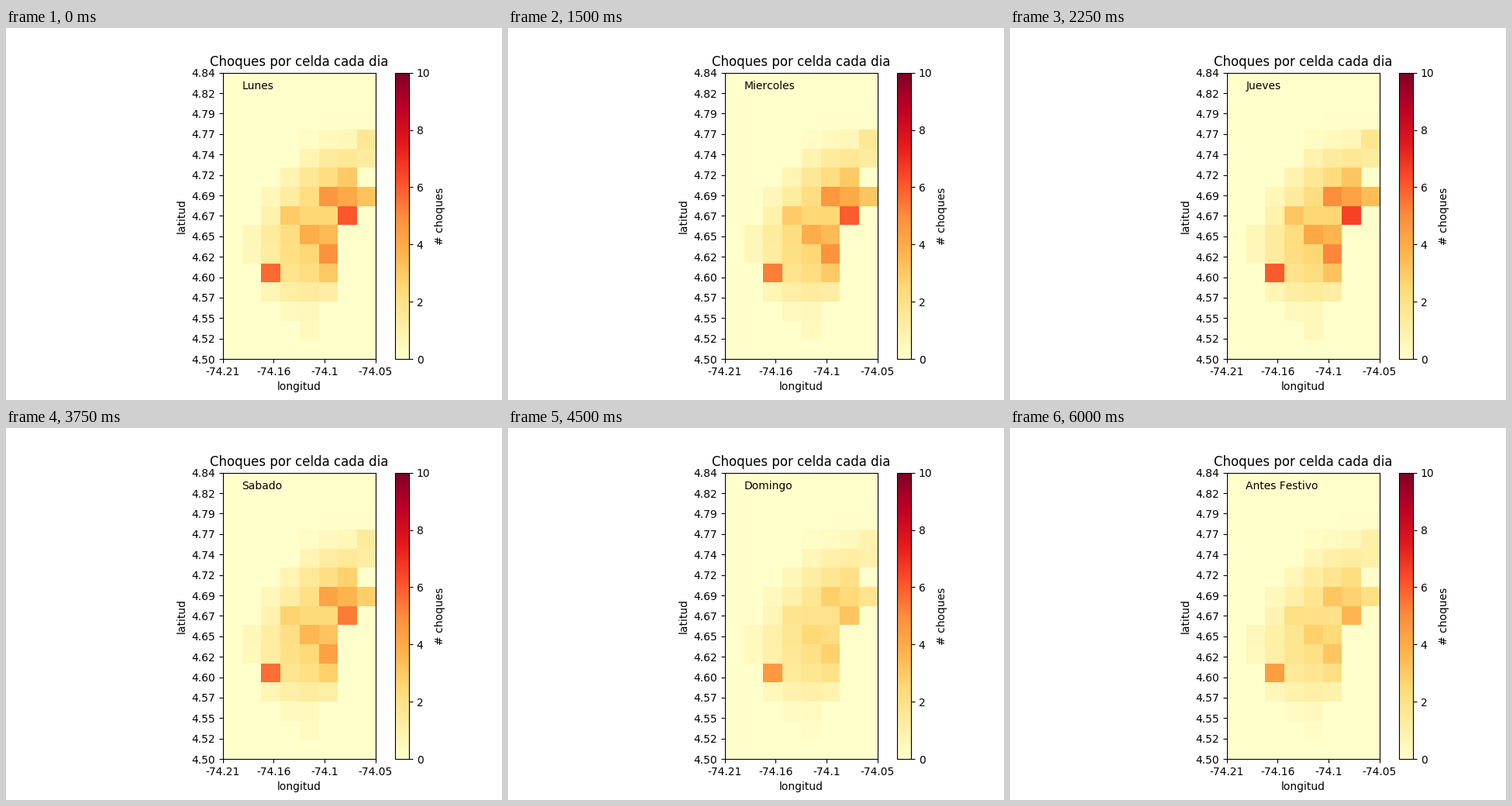
Animation, 640 px wide and 480 px high, one loop 6.75 s. Source, as a matplotlib script:

```python
import numpy as np
import matplotlib.pyplot as plt
from matplotlib.animation import FuncAnimation

ROWS, COLS = 15, 8
PEAK = 2.6
TERMINAL = 10, 2

# busy corners: row, column, extra crashes on a normal workday
CORNERS = [
    (7, 6, 4.3), (9, 5, 2.7), (6, 5, 2.1), (6, 6, 1.9), (6, 7, 1.9),
    (8, 4, 1.3), (8, 5, 1.3), (10, 5, 1.2), (7, 3, 1.2), (3, 7, 1.0),
    (5, 6, 0.8), (13, 4, 0.4),
]

# name, traffic level, corner level, crashes at the terminal
DAYS = [
    ("Lunes", 1.0, 1.0, 5.7),
    ("Martes", 1.0, 1.0, 5.5),
    ("Miercoles", 1.0, 0.98, 5.3),
    ("Jueves", 1.02, 1.1, 6.0),
    ("Viernes", 1.05, 1.22, 6.6),
    ("Sabado", 0.95, 0.85, 5.6),
    ("Domingo", 0.75, 0.42, 4.6),
    ("Festivo", 0.6, 0.2, 4.6),
    ("Antes Festivo", 0.8, 0.52, 4.4),
]


def city_base():
    """Smooth ridge that leans north-east, cut off at the city limits."""
    r, c = np.mgrid[:ROWS, :COLS]
    middle = 4 + 0.5 * np.maximum(0, 8 - r)
    across = np.exp(-0.5 * ((c - middle) / 1.7) ** 2)
    along = np.exp(-((r - 7.4) / 4) ** 4)
    west = c >= 0.5 + 0.59 * abs(r - 8.5)
    east = (c < np.maximum(5.5, 13.5 - r)) & (c + r < 17)
    base = PEAK * across * along * (west & east)
    base[5, 7] = 0
    return base


BASE = city_base()


def crashes(traffic, corner, terminal):
    cells = traffic * BASE
    for row, col, extra in CORNERS:
        cells[row, col] += corner * extra
    cells[TERMINAL] = terminal
    return cells


plt.rcParams["text.kerning_factor"] = 6
fig, ax = plt.subplots(figsize=(6.4, 4.8), dpi=100)
image = ax.imshow(BASE, cmap="YlOrRd", vmin=0, vmax=10)
fig.colorbar(image, ax=ax, label="# choques")

lons = np.linspace(-74.21, -74.05, 4)
lats = np.linspace(4.84, 4.50, 15)
ax.set_xticks(np.linspace(-0.5, COLS - 0.5, len(lons)),
              [str(round(float(v), 2)) for v in lons])
ax.set_yticks(np.linspace(-0.5, ROWS - 0.5, len(lats)),
              [f"{v:.2f}" for v in lats])
ax.set_xlabel("longitud")
ax.set_ylabel("latitud")
ax.set_title("Choques por celda cada dia")
label = ax.text(0.5, 0.5, "", va="bottom")


def update(i):
    name, *levels = DAYS[i]
    image.set_data(crashes(*levels))
    label.set_text(name)
    return image, label


anim = FuncAnimation(fig, update, frames=len(DAYS), interval=750, repeat=True)
plt.show()
```
